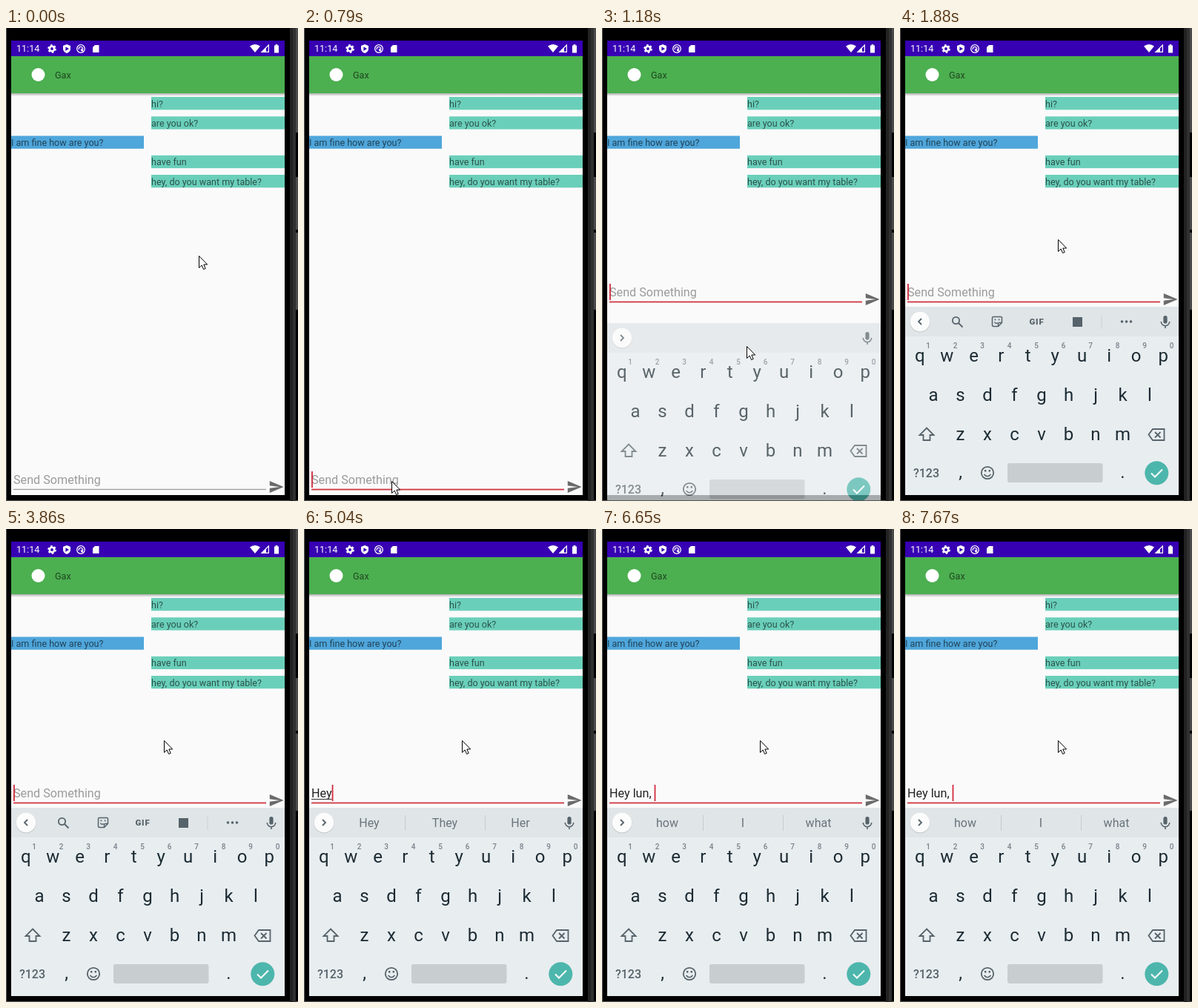
Animation of 394x638 px, one loop 8000 ms. Source, as an HTML page:

```html
<!DOCTYPE html>
<html lang="en">
<head>
<meta charset="utf-8">
<title>Chat</title>
<style>
  html, body { margin: 0; width: 100%; height: 100%; overflow: hidden; background: #000; }
  svg { display: block; font-family: Roboto, "Open Sans", sans-serif; }
  .msg { font-size: 12.57px; fill: #000; fill-opacity: .6; }
  .field { font-size: 16.16px; }
  .mid { text-anchor: middle; }
  .key { font-size: 24px; fill: #1c2b33; }
  .num { font-size: 10px; font-weight: 500; fill: #78838a; }
  .word { font-size: 16px; fill: #69747a; }
  .line { fill: none; stroke: #56636a; stroke-width: 1.8; }
  .solid { fill: #56636a; }
</style>
</head>
<body>
<svg width="394" height="638" viewBox="0 0 394 638">
  <defs>
    <linearGradient id="shade" x2="0" y2="1">
      <stop stop-color="#000" stop-opacity=".3"/>
      <stop offset="1" stop-color="#000" stop-opacity="0"/>
    </linearGradient>
    <clipPath id="glass"><path d="M7 17H376V637H7Z"/></clipPath>
  </defs>

  <!-- phone body -->
  <rect width="394" height="638"/>
  <path d="M.5 0V638M0 637.5H394" stroke="#555"/>
  <rect x="383" width="4" height="638" fill="#222"/>
  <rect x="387" width="4" height="638" fill="#303030"/>
  <path d="M392.5 0V141M392.5 201V272M392.5 276V380" stroke="#4a4a4a" stroke-width="3"/>

  <!-- screen -->
  <rect x="7" y="17" width="369" height="613" fill="#fafafa"/>
  <rect x="7" y="88" width="369" height="4" fill="url(#shade)"/>
  <rect x="7" y="38" width="369" height="50" fill="#4caf50"/>
  <rect x="7" y="17" width="369" height="21" fill="#3700b3"/>
  <circle cx="43.5" cy="63" r="9" fill="#fff"/>
  <text class="msg" x="66" y="68">Gax</text>

  <!-- status bar -->
  <g fill="#fff">
    <text x="14" y="32.3" font-size="12.57">11:14</text>
    <circle cx="62" cy="28" r="3.2" fill="none" stroke="#fff" stroke-width="2.6"/>
    <circle cx="62" cy="28" r="5" fill="none" stroke="#fff" stroke-width="1.8" stroke-dasharray="2.6 2.636"/>
    <path d="M82 22L87 24V28Q87 32 82 34Q77 32 77 28V24Z"/>
    <path d="M80.4 25.2V30.8L85 28Z" fill="#3700b3"/>
    <circle cx="101" cy="28" r="5.3" fill="none" stroke="#fff" stroke-width="1.3"/>
    <path d="M98.4 29A2.7 2.7 0 1 1 101 30.7M101 28L104 31.5" fill="none" stroke="#fff" stroke-width="1.3"/>
    <path d="M120 23H125.5V33H117V26Z"/>
    <path d="M336 33L329 24.6Q336 19.6 343 24.6Z"/>
    <path d="M354.4 23V32.4H345Z" fill="none" stroke="#fff" stroke-width="1.2"/>
    <path d="M351 26V33H344Z"/>
    <path d="M362 23.5H363.7V22H366.3V23.5H368V33.5H362Z"/>
  </g>
  <g id="chat"></g>

  <!-- message input -->
  <g id="input">
    <text id="hint" class="field" x="10" y="362" fill="#9b9b9b">Send Something</text>
    <text id="typed" class="field" x="10" y="362" fill="#212121"></text>
    <path id="compose" stroke="#333"/>
    <rect id="rule" x="10" width="341"/>
    <rect id="caret" y="345" width="1.8" height="22" fill="#d22a3c"/>
    <path transform="translate(354 355.2) scale(.898)" fill="#6b6b6b" d="M2 21L23 12 2 3V10L17 12 2 14Z"/>
  </g>

  <!-- keyboard -->
  <g clip-path="url(#glass)">
    <g id="board">
      <rect x="7" y="376" width="369" height="254" fill="#e8edf0"/>
      <rect x="7" y="376" width="369" height="40" fill="#e0e5e8"/>
      <circle cx="27" cy="397" r="13.6" fill="#000" fill-opacity=".1"/>
      <circle cx="27" cy="396" r="13.2" fill="#fcfcfc"/>
      <path id="chevron" class="line"/>
      <g class="solid">
        <rect x="355.4" y="388" width="5.2" height="10.5" rx="2.6"/>
        <path class="line" style="stroke-width:1.6" d="M352.3 396A5.7 5.7 0 0 0 363.7 396M358 401.5V405"/>
      </g>
      <g id="tools">
        <circle class="line" cx="75.5" cy="394.5" r="4.6"/>
        <path class="line" d="M79 398L84.5 403.5"/>
        <path class="line" style="stroke-width:1.5" d="M126 389.5H136Q137.5 389.5 137.5 391V397.5L132.500 402.500H126Q124.500 402.500 124.500 401V391Q124.500 389.500 126 389.500ZM137.500 397.500H134Q132.500 397.500 132.500 399V402.500M127.500 396.500Q129 399.500 132 397.500"/>
        <path class="solid" d="M127.500 392.500H129.300V394.300H127.500ZM132.700 392.500H134.500V394.300H132.700Z"/>
        <text class="mid solid" x="184.500" y="400" font-size="11.500" font-weight="900" letter-spacing=".8">GIF</text>
        <rect class="solid" x="233" y="390" width="13" height="13"/>
        <path d="M272 387V406" stroke="#cbd1d5"/>
        <g class="solid"><circle cx="299.500" cy="396" r="1.800"/><circle cx="305.500" cy="396" r="1.800"/><circle cx="311.500" cy="396" r="1.800"/></g>
      </g>
      <g id="words">
        <path d="M136.500 386V407M244.500 386V407" stroke="#c5cbcf"/>
        <text class="mid word" x="88" y="402"></text>
        <text class="mid word" x="190" y="402"></text>
        <text class="mid word" x="292" y="402"></text>
      </g>
      <g id="keys"></g>
      <path class="line" d="M36 539.500L45.500 549H40.500V556H31.500V549H26.500Z"/>
      <path class="line" d="M341 541H356.500V556H341L335.500 548.500ZM344 545L351.500 552.500M351.500 545L344 552.500"/>
      <text class="mid" x="35.500" y="605.500" font-size="16" font-weight="500" fill="#56636a">?123</text>
      <circle class="line" cx="118" cy="600" r="8.200"/>
      <path class="line" style="stroke-width:1.600" d="M113.500 602Q118 607.500 122.500 602"/>
      <path class="solid" d="M114 596H116.400V598.400H114ZM119.600 596H122V598.400H119.600Z"/>
      <rect x="145" y="587" width="128.500" height="26" rx="3" fill="#c8cdd0"/>
      <circle cx="346.300" cy="600.300" r="16" fill="#4db6ac"/>
      <path d="M339 600.500L344 605.500L354 595.500" fill="none" stroke="#fff" stroke-width="2"/>
    </g>
  </g>

  <path id="mouse" d="M.5 .5V16.500L4.200 13L6.600 18.500L9.200 17.400L6.800 12H11.700Z" fill="#fff" stroke="#000"/>
</svg>
<script>
const LOOP = 8000;
const $ = id => document.getElementById(id);
const attr = (el, o) => { for (const k in o) el.setAttribute(k, o[k]); };
const add = (parent, tag, o, text = '') => {
  const el = document.createElementNS('http://www.w3.org/2000/svg', tag);
  attr(el, o);
  el.textContent = text;
  parent.appendChild(el);
};

// Chat bubbles: text, top, sent by me
[['hi?', 93, 1], ['are you ok?', 119.3, 1], ['I am fine how are you?', 145.5, 0],
 ['have fun', 171.8, 1], ['hey, do you want my table?', 198, 1]].forEach(([text, y, mine]) => {
  const x = mine ? 196 : 7;
  add($('chat'), 'rect', { x, y, width: mine ? 180 : 179, height: 17.3, fill: mine ? '#6acfba' : '#4fa6db' });
  add($('chat'), 'text', { x, y: y + 13.5, class: 'msg' }, text);
});

// Letter keys: letters, first centre, baseline
[['qwertyuiop', 26.7, 450], ['asdfghjkl', 45, 503], ['zxcvbnm', 81.5, 556]].forEach(([row, x0, y], r) =>
  [...row].forEach((c, i) => {
    const x = x0 + i * 36.5;
    add($('keys'), 'text', { x, y, class: 'mid key' }, c);
    if (!r) add($('keys'), 'text', { x: x + 11.5, y: 432, class: 'mid num' }, (i + 1) % 10);
  }));
add($('keys'), 'text', { x: 81.5, y: 607, class: 'mid key' }, ',');
add($('keys'), 'text', { x: 300.5, y: 607, class: 'mid key' }, '.');

// Timelines: [start ms, ...values]
const pointer = [[0, 260, 307], [120, 240, 350], [245, 180, 470], [370, 129, 564], [520, 120, 602],
  [670, 118, 611], [795, 120, 608], [910, 140, 574], [1060, 195, 429], [1185, 197, 400],
  [1310, 199, 380], [1460, 204, 330], [1610, 211, 289], [1750, 213, 286], [1880, 213, 285]];
const slide = [[0, 0, 0], [1060, 22, .72], [1185, 5, .94], [1310, 0, 1]];
const blink = [0, 670, 1460, 1880, 2350, 2960, 3400, 3860, 4460, 4740, 5480, 5630, 7080, 7670];
// committed text, text being composed, suggestions
const typing = [[0, '', '', ''],
  [4740, '', 'H', 'H Hi How'], [4890, '', 'He', 'He Hey Hello'], [5040, '', 'Hey', 'Hey They Her'],
  [5630, 'Hey ', '', 'how I you'], [6070, 'Hey ', 'lu', 'lu Lurn Lup'], [6220, 'Hey ', 'lun', 'lu Lurn Lup'],
  [6370, 'Hey ', 'lun', 'lun Lurn Lunnveg'], [6500, 'Hey lun,', '', 'how I what'], [6650, 'Hey lun, ', '', 'how I what']];

const at = (list, t) => list.filter(e => e[0] <= t).pop().slice(1);
const show = (el, on) => { el.style.display = on ? '' : 'none'; };
const typed = $('typed');
const measure = s => {
  typed.textContent = s.replace(/ /g, '\u00a0');
  return s ? typed.getComputedTextLength() : 0;
};

function draw(t) {
  const [mx, my] = at(pointer, t), [drop, alpha] = at(slide, t);
  const [done, part, hints] = at(typing, t);
  const focus = t >= 670;
  attr($('mouse'), { transform: `translate(${mx} ${my})` });

  attr($('input'), { transform: `translate(0 ${t < 1060 ? 253 : 0})` });
  attr($('rule'), focus ? { y: 368.6, height: 1.8, fill: '#cf3540' } : { y: 368.8, height: 1, fill: '#858585' });
  show($('hint'), !done && !part);
  const from = 10 + measure(done), end = 10 + measure(done + part);
  attr($('compose'), { d: part ? `M${from} 364.5H${end}` : '' });
  attr($('caret'), { x: end });
  show($('caret'), blink.filter(b => b <= t).length % 2 === 0);

  attr($('board'), { transform: `translate(0 ${drop})`, opacity: alpha });
  const tools = t >= 1185 && !hints;
  show($('tools'), tools);
  show($('words'), hints);
  attr($('chevron'), { d: tools ? 'M29 392L25 396L29 400' : 'M25 392L29 396L25 400' });
  const words = hints.split(' ');
  $('words').querySelectorAll('text').forEach((el, i) => { el.textContent = words[i] || ''; });
}

function tick() {
  draw(performance.now() % LOOP);
  requestAnimationFrame(tick);
}
tick();
</script>
</body>
</html>
```
